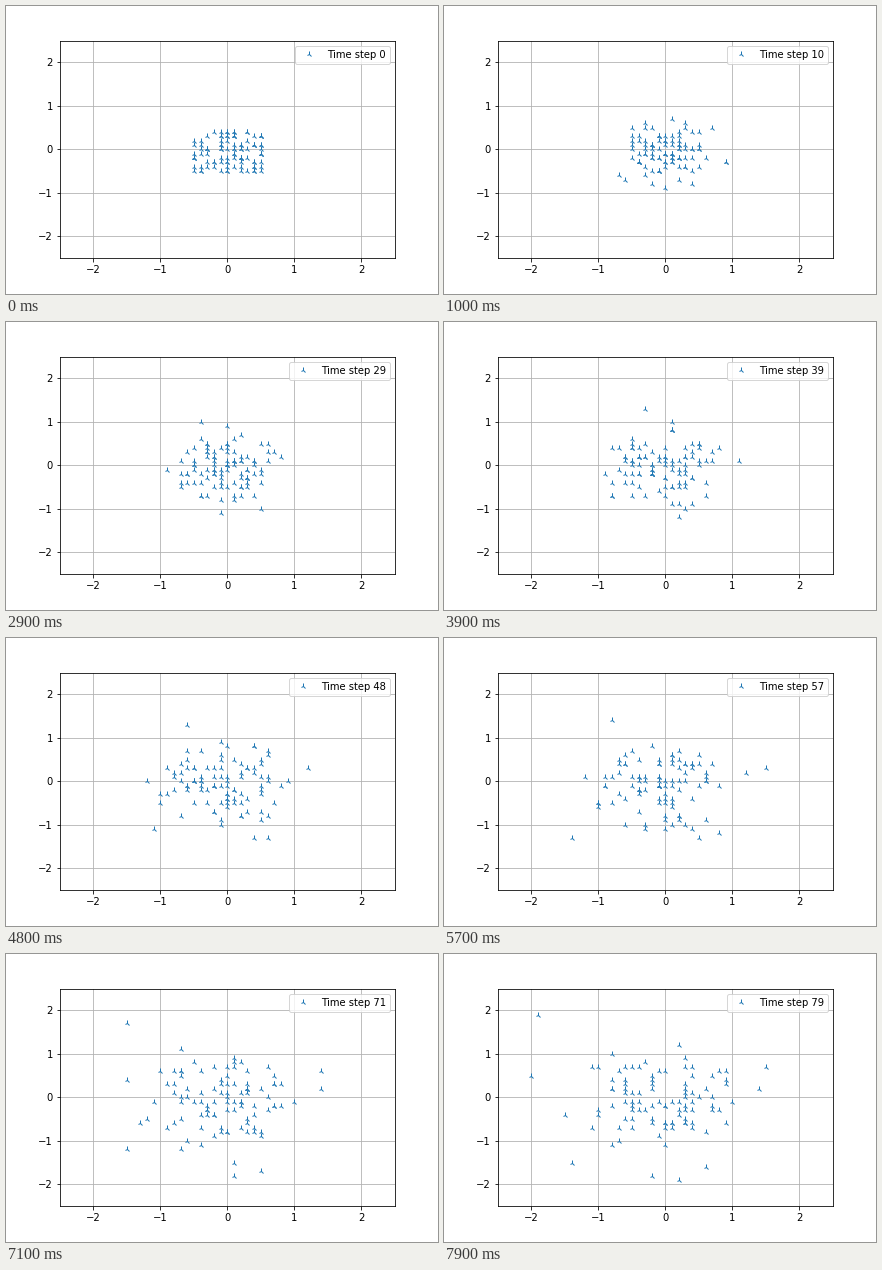
These frames come from a looping animation (432x288 px, 8 s). A matplotlib script:

```python
import numpy as np
import matplotlib.pyplot as plt
from matplotlib.animation import FuncAnimation

STEPS, WALKERS, CELL = 80, 100, 0.1
MOVES = STEPS - 1
# Cells where the farthest wanderers finish
FAR = [(-19, 19), (-20, 5), (-14, -15), (15, 7), (14, 2),
       (2, -19), (-2, -18), (6, -16)]
rng = np.random.default_rng(7)


def to_path(start, u, v):
    """Turn +-1 steps along both diagonals into a 4-direction walk."""
    moves = np.column_stack([u + v, u - v]) // 2
    return np.vstack([start, start + np.cumsum(moves, axis=0)])


def bridge(total):
    """Shuffled +-1 steps with a fixed sum."""
    ups = (MOVES + total) // 2
    return rng.permutation(np.where(np.arange(MOVES) < ups, 1, -1))


def guided(start, end):
    dx, dy = end - start
    if (dx + dy + MOVES) % 2:  # an unreachable cell: begin one cell aside
        start, dx = start - (1, 0), dx + 1
    return to_path(start, bridge(dx + dy), bridge(dx - dy))


def free(start):
    """Random walk kept inside a slowly growing cloud."""
    low = -8 - np.arange(STEPS)[:, None] / 10
    while True:
        path = to_path(start, *rng.choice([-1, 1], (2, MOVES)))
        if np.all(path >= low) and np.all(path <= (10, 13)):
            return path


starts = rng.integers((-5, -5), (6, 5), size=(WALKERS, 2))
walks = [guided(s, np.array(end)) for s, end in zip(starts, FAR)]
walks += [free(s) for s in starts[len(FAR):]]
walks = CELL * np.array(walks)

plt.rcParams.update({"font.family": "DejaVu Sans", "text.kerning_factor": 6})
fig, ax = plt.subplots(figsize=(6, 4), dpi=72)
fig.subplots_adjust(bottom=0.125)
ax.set(xlim=(-2.5, 2.5), ylim=(-2.5, 2.5),
       xticks=range(-2, 3), yticks=range(-2, 3))
ax.grid(True)
dots, = ax.plot([], [], "2", color="C0", label="Time step 0")
label = ax.legend(loc="upper right").get_texts()[0]


def update(step):
    dots.set_data(walks[:, step, 0], walks[:, step, 1])
    label.set_text(f"Time step {step}")
    return dots, label


anim = FuncAnimation(fig, update, frames=STEPS, interval=1000 // 10,
                     repeat=True, repeat_delay=0)
plt.show()
```
